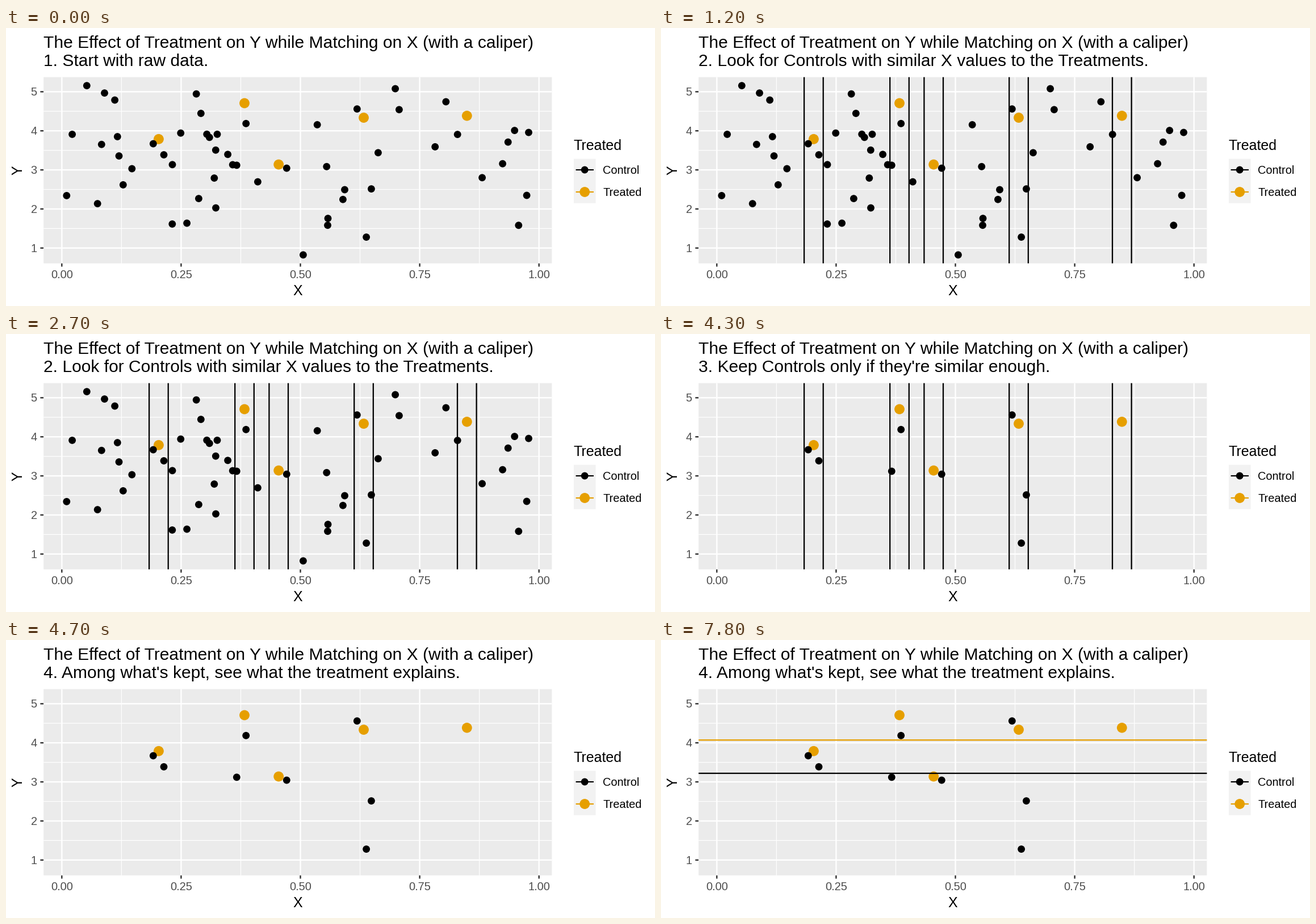
Write a matplotlib script that moves like this. It is 1143 by 490 pixels and loops after 8 s.

```python
import matplotlib.pyplot as plt
from matplotlib.animation import FuncAnimation
from matplotlib.patches import Circle, Rectangle

W, H, DPI = 1143, 490, 64
PT = 72 / DPI  # points per pixel
STEP, LOOP = 100, 8000
LEFT, RIGHT, TOP, BOTTOM = 66.2, 961.4, 86.6, 414.8
ORANGE = "#E69F00"

plt.rcParams["font.family"] = "Liberation Sans"
fig = plt.figure(figsize=(W / DPI, H / DPI), dpi=DPI, facecolor="white")
ax = fig.add_axes([0, 0, 1, 1])
ax.set(xlim=(0, W), ylim=(H, 0))
ax.axis("off")


def px(x):
    return 98.3 + 840.4 * x


def py(y):
    return 456.7 - 68.87 * y


def line(x0, y0, x1, y1, color, width, z=1):
    return ax.plot([x0, x1], [y0, y1], color=color, lw=width * PT, zorder=z,
                   solid_capstyle="butt", snap=False)[0]


def dot(x, y, treated=False):
    return ax.add_patch(Circle((x, y), 8.9 if treated else 6.4, lw=0,
                               fc=ORANGE if treated else "black",
                               zorder=3 if treated else 4))


def box(x, y, w, h, color):
    ax.add_patch(Rectangle((x, y), w, h, fc=color, lw=0, zorder=0, snap=False))


def text(x, y, s, size, color="black", **kw):
    kw = {"ha": "left", "va": "baseline", **kw}
    return ax.text(x, y, s, fontsize=size * PT, color=color, **kw)


# Panel, grid and axes
box(LEFT, TOP, RIGHT - LEFT, BOTTOM - TOP, "#EBEBEB")
for i in range(4):
    x, y = px(0.125 + 0.25 * i), py(1.5 + i)
    line(x, TOP, x, BOTTOM, "white", 1.2)
    line(LEFT, y, RIGHT, y, "white", 1.2)
for i in range(5):
    x, y = px(0.25 * i), py(1 + i)
    line(x, TOP, x, BOTTOM, "white", 2.4, 1.1)
    line(LEFT, y, RIGHT, y, "white", 2.4, 1.1)
    line(x, BOTTOM, x, BOTTOM + 5.8, "#333333", 2.4)
    line(LEFT - 5.8, y, LEFT, y, "#333333", 2.4)
    text(x - 19.4, 441, f"{0.25 * i:.2f}", 20, "#4D4D4D")
    text(43.7, y + 7, str(1 + i), 20, "#4D4D4D")
text(505.4, 471, "X", 25)
text(21.5, 250.6, "Y", 25, rotation=90, ha="center", va="center")

# Legend
text(1000, 215, "Treated", 25)
box(1000, 230.6, 38.6, 78.2, "#F2F2F2")
for y, label, color in ((250, "Control", "black"), (289, "Treated", ORANGE)):
    line(1003.6, y, 1035, y, color, 2.2)
    dot(1019.2, y, label == "Treated")
    text(1051, y + 7, label, 20)

text(66, 35, "The Effect of Treatment on Y while Matching on X (with a caliper)", 30)
subtitle = text(66, 67, "", 30)

# Observations, in pixels
TREATED = [(268.9, 195.8), (420, 132.5), (480.2, 240.6), (630, 158.1), (811.8, 154.7)]
KEPT = [(259.3, 204), (278, 223.5), (406.3, 241.9), (422.7, 168.4),
        (494.3, 247.1), (618.3, 142.7), (643.4, 283.6), (634.6, 368.6)]
DROPPED = [
    (142.3, 101.6), (173.5, 114.6), (191.6, 127), (116.6, 187.4), (196.3, 191.5),
    (168.3, 205.2), (199, 225.5), (221.8, 248), (206.3, 276.4), (106.8, 295.4),
    (161.2, 309.6), (307.7, 185.2), (293, 240.8), (292.8, 345.5), (318.6, 344),
    (335.2, 116.2), (343.3, 150.5), (353.7, 187.2), (358.3, 192.8), (372, 187.3),
    (369.3, 215.2), (390.6, 222.8), (399.2, 241), (366.8, 264.5), (339.4, 300.6),
    (369.5, 317.1), (443.4, 271.1), (523.4, 399.9), (548.2, 170.5), (564.7, 244.3),
    (596.5, 285), (593.4, 302.2), (567, 335.6), (566.5, 347.7), (655.4, 219.8),
    (685.6, 107), (692.4, 143.9), (774.8, 130), (795.2, 187.6), (755.7, 209.4),
    (838.6, 263.8), (874.6, 239.2), (884.2, 201.1), (895.7, 180.6), (920.5, 184.1),
    (917.1, 295), (902.8, 347.8)]

for p in TREATED:
    dot(*p, treated=True)
for p in KEPT:
    dot(*p)
dropped = [dot(*p) for p in DROPPED]

CALIPER = 0.02 * 840.4
calipers = [line(x + d, TOP, x + d, BOTTOM, "black", 2.3, 5)
            for x, _ in TREATED for d in (-CALIPER, CALIPER)]


def mean_line(points, color):
    y = sum(p[1] for p in points) / len(points)
    return line(LEFT, y, RIGHT, y, color, 2.3, 5)


means = [mean_line(TREATED, ORANGE), mean_line(KEPT, "black")]

STAGES = [(0, "1. Start with raw data."),
          (500, "2. Look for Controls with similar X values to the Treatments."),
          (3700, "3. Keep Controls only if they're similar enough."),
          (4700, "4. Among what's kept, see what the treatment explains.")]


def show(artists, visible):
    for artist in artists:
        artist.set_visible(visible)


def update(i):
    t = i * STEP
    subtitle.set_text([s for start, s in STAGES if t >= start][-1])
    show(dropped, t < 3700)
    show(calipers, 1200 <= t < 4700)
    show(means, t >= 7800)
    return []


anim = FuncAnimation(fig, update, frames=LOOP // STEP, interval=STEP,
                     init_func=lambda: update(0), repeat=True, repeat_delay=0)
plt.show()
```
